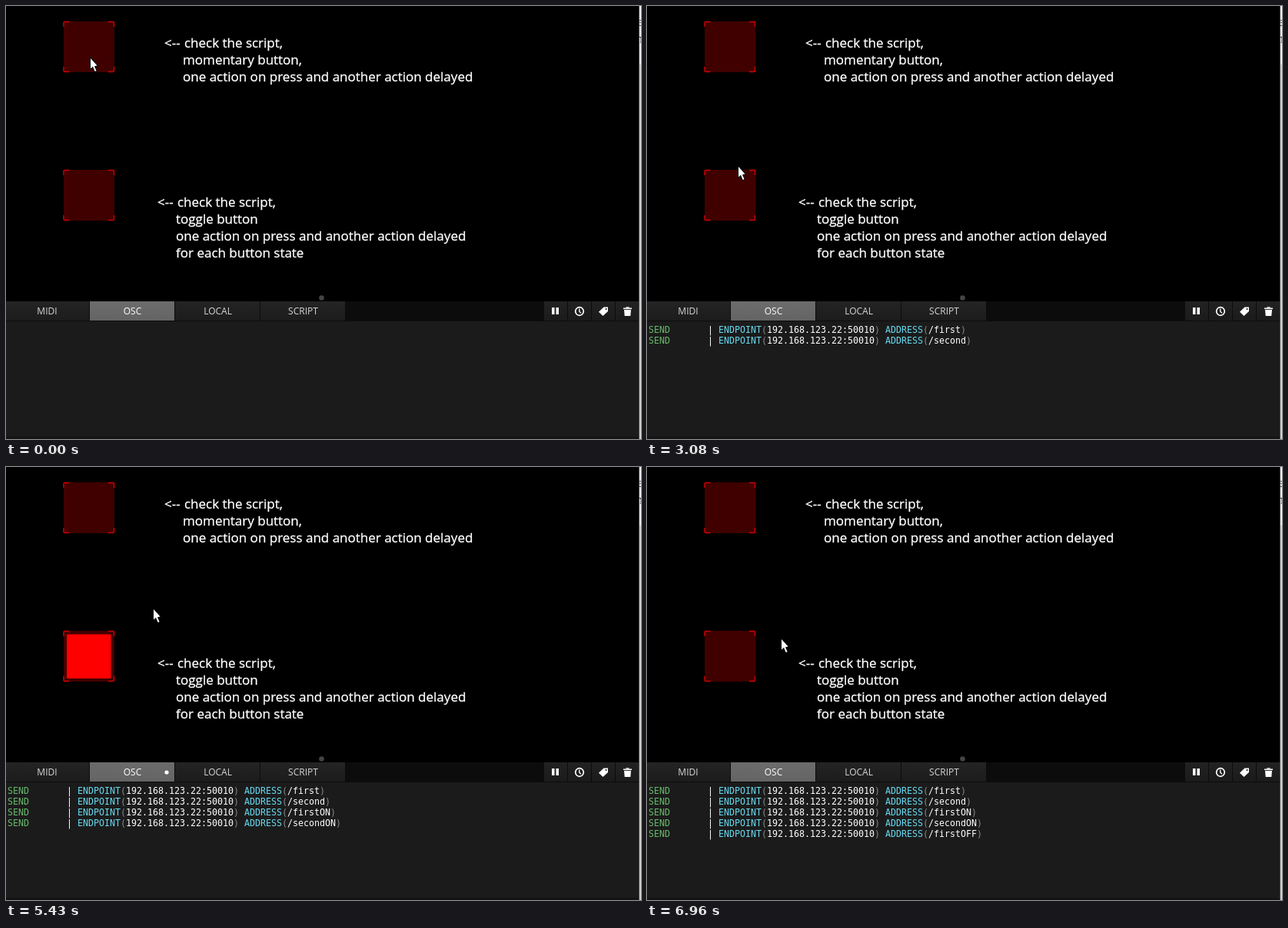
An HTML page with a canvas that plays this animation: 826x563 px, repeating every 8000 ms.

```html
<!DOCTYPE html>
<html lang="en">
<head>
<meta charset="utf-8">
<title>Button scripts</title>
<style>
  html, body { margin: 0; width: 100%; height: 100%; overflow: hidden; background: #000; }
  canvas { display: block; }
</style>
</head>
<body>
<canvas id="stage" width="826" height="563"></canvas>
<script>
const ctx = document.getElementById('stage').getContext('2d');
const LOOP = 8000;
const SANS = '"Open Sans", "Noto Sans", sans-serif';
const MONO = '11.63px "DejaVu Sans Mono", monospace';

// Log entries: arrival time and address
const LOG = [
  [330, '/first'], [2290, '/second'], [3470, '/firstON'],
  [5430, '/secondON'], [6720, '/firstOFF']
];

// Pointer moves: start, step length, step count, destination
const START = [110, 68];
const MOVES = [
  [1280, 30, 4, 151, 138],
  [2980, 32, 6, 103, 245],
  [3540, 31.4, 8, 192, 185],
  [6250, 31.4, 4, 155, 227],
  [6375.6, 31.4, 4, 119, 262],
  [6770, 31.6, 7, 175, 224]
];

const within = (t, a, b) => t >= a && t < b;

function rect(x, y, w, h, color) {
  ctx.fillStyle = color;
  ctx.fillRect(x, y, w, h);
}

function disc(x, y, r, color) {
  ctx.fillStyle = color;
  ctx.beginPath();
  ctx.arc(x, y, r, 0, Math.PI * 2);
  ctx.fill();
}

function poly(points) {
  ctx.beginPath();
  points.forEach(([x, y]) => ctx.lineTo(x, y));
  ctx.closePath();
}

function text(str, x, y, font, color, align = 'left') {
  ctx.font = font;
  ctx.fillStyle = color;
  ctx.textAlign = align;
  ctx.fillText(str, x, y);
}

function shade(top, bottom) {
  const g = ctx.createLinearGradient(0, 384, 0, 409);
  g.addColorStop(0, top);
  g.addColorStop(1, bottom);
  return g;
}

function pointerAt(t) {
  let [x, y] = START;
  for (const [start, dt, n, tx, ty] of MOVES) {
    if (t < start) break;
    const k = Math.min(1, (Math.floor((t - start) / dt) + 1) / n);
    x += (tx - x) * k;
    y += (ty - y) * k;
  }
  return [Math.round(x), Math.round(y)];
}

function button(y, on) {
  const x = 75, s = 66;
  rect(x, y, s, s, '#400000');
  if (on) {
    ctx.fillStyle = '#f00';
    ctx.beginPath();
    ctx.roundRect(x + 4, y + 4.5, 57.5, 57.5, 1.5);
    ctx.fill();
  }
  ctx.strokeStyle = '#d40000';
  ctx.lineWidth = 1.4;
  for (const sx of [1, -1]) for (const sy of [1, -1]) {
    const cx = sx > 0 ? x : x + s - 0.5;
    const cy = sy > 0 ? y + 0.5 : y + s - 0.5;
    ctx.beginPath();
    ctx.moveTo(cx, cy + 6.5 * sy);
    ctx.lineTo(cx, cy + 1.5 * sy);
    ctx.quadraticCurveTo(cx, cy, cx + 1.5 * sx, cy);
    ctx.lineTo(cx + 7.5 * sx, cy);
    ctx.stroke();
  }
}

function note(x, y, lines) {
  const write = (str, tx, ty) => {
    text(str, tx, ty, '17px ' + SANS, '#fff');
    ctx.strokeStyle = '#fff';
    ctx.lineWidth = 0.3;
    ctx.strokeText(str, tx, ty);
  };
  write('<--', x, y);
  lines.forEach((line, i) => write(line, x + (i ? 24 : 26), y + i * 22));
}

function icons() {
  for (let i = 0; i < 4; i++) rect(700 + i * 31, 384, 30, 25, shade('#222', '#1b1b1b'));
  rect(710, 392, 3.5, 9, '#fff');
  rect(715.5, 392, 3.5, 9, '#fff');

  ctx.strokeStyle = '#fff';
  ctx.lineWidth = 1.7;
  ctx.beginPath();
  ctx.arc(746, 397, 5.3, 0, Math.PI * 2);
  ctx.stroke();
  ctx.lineWidth = 1.3;
  ctx.beginPath();
  ctx.moveTo(745.8, 393.5);
  ctx.lineTo(745.8, 397.2);
  ctx.lineTo(748, 399.2);
  ctx.stroke();

  ctx.fillStyle = '#fff';
  poly([[777.5, 391.5], [783, 391.5], [783, 397], [776.5, 403], [771, 397.8]]);
  ctx.fill();
  disc(780.6, 394, 1.1, '#1e1e1e');

  rect(803, 392.5, 11, 1.6, '#fff');
  rect(806.5, 391.3, 4, 1.4, '#fff');
  ctx.fillStyle = '#fff';
  poly([[804, 395], [813, 395], [812.3, 403], [804.7, 403]]);
  ctx.fill();
}

function panel(alert) {
  rect(0, 384, 823, 26, '#0c0c0c');
  ['MIDI', 'OSC', 'LOCAL', 'SCRIPT'].forEach((name, i) => {
    const x = i ? i * 111 - 2 : 0;
    const active = i === 1;
    rect(x, 384, i ? 110 : 108, 25, active ? shade('#6c6c6c', '#646464') : shade('#242424', '#1c1c1c'));
    text(name, i * 111 + 53.5, 401, '12px ' + SANS, active ? '#fff' : '#d6d6d6', 'center');
  });
  if (alert) disc(209, 397, 2.6, '#fff');
  icons();
  rect(0, 410, 823, 150, '#1b1b1b');
  rect(0, 560, 823, 3, '#141414');
}

function logLine(path, y) {
  const parts = [
    [0, 'SEND', '#66bb6a'], [11, '|', '#fff'],
    [13, 'ENDPOINT', '#66d9ef'], [21, '(', '#888'],
    [22, '192.168.123.22:50010', '#fff'], [42, ')', '#888'],
    [44, 'ADDRESS', '#66d9ef'], [51, '(', '#888'],
    [52, path, '#fff'], [52 + path.length, ')', '#888']
  ];
  for (const [col, str, color] of parts) text(str, 2 + col * 7, y, MONO, color);
}

function edge() {
  rect(823, 0, 1, 563, '#555');
  rect(824, 0, 2, 563, '#d2d0ce');
  rect(824, 0, 2, 76, '#ececec');
  ctx.save();
  ctx.beginPath();
  ctx.rect(823, 0, 3, 76);
  ctx.clip();
  text('e', 821, 26, '16px "Liberation Serif", serif', '#333');
  text('n', 820, 48, '16px "Liberation Serif", serif', '#333');
  ctx.restore();
}

function pointer(x, y, fill) {
  ctx.save();
  ctx.translate(x, y);
  poly([[0, 0], [0, 13.5], [3, 10.8], [5.6, 17], [7.6, 16.2], [5, 10.2], [8.6, 9.6]]);
  ctx.strokeStyle = '#000';
  ctx.lineWidth = 2;
  ctx.lineJoin = 'round';
  ctx.stroke();
  ctx.fillStyle = fill;
  ctx.fill();
  ctx.restore();
}

function pointerFill(t, pressed) {
  if (pressed) {
    const g = ctx.createLinearGradient(0, 2, 3, 16);
    g.addColorStop(0, '#84f078');
    g.addColorStop(0.5, '#6cf0a0');
    g.addColorStop(1, '#30f0f0');
    return g;
  }
  const tinted = within(t, 430, 1280) || within(t, 3760, 4250) || within(t, 5890, 5950);
  return tinted ? '#d4ffff' : '#fff';
}

function draw(t) {
  const firstDown = within(t, 330, 430);
  const pressed = firstDown || within(t, 3420, 3540) || within(t, 6670, 6770);
  const [px, py] = pointerAt(t);

  rect(0, 0, 826, 563, '#000');
  button(20, firstDown);
  button(213, within(t, 3420, 6670));
  note(206, 54, ['check the script,', 'momentary button,',
    'one action on press and another action delayed']);
  note(197, 261, ['check the script,', 'toggle button',
    'one action on press and another action delayed', 'for each button state']);
  disc(410.5, 379.5, 3.3, '#444');

  panel(LOG.some(([at]) => within(t, at, at + 100)));
  LOG.filter(([at]) => t >= at).forEach(([, path], i) => logLine(path, 425 + i * 14));
  edge();

  if (pressed) disc(px - 1, py - 1, 12, 'rgba(255,255,0,0.5)');
  pointer(px, py, pointerFill(t, pressed));
}

const began = performance.now();
function tick() {
  draw((performance.now() - began) % LOOP);
  requestAnimationFrame(tick);
}
tick();
</script>
</body>
</html>
```
